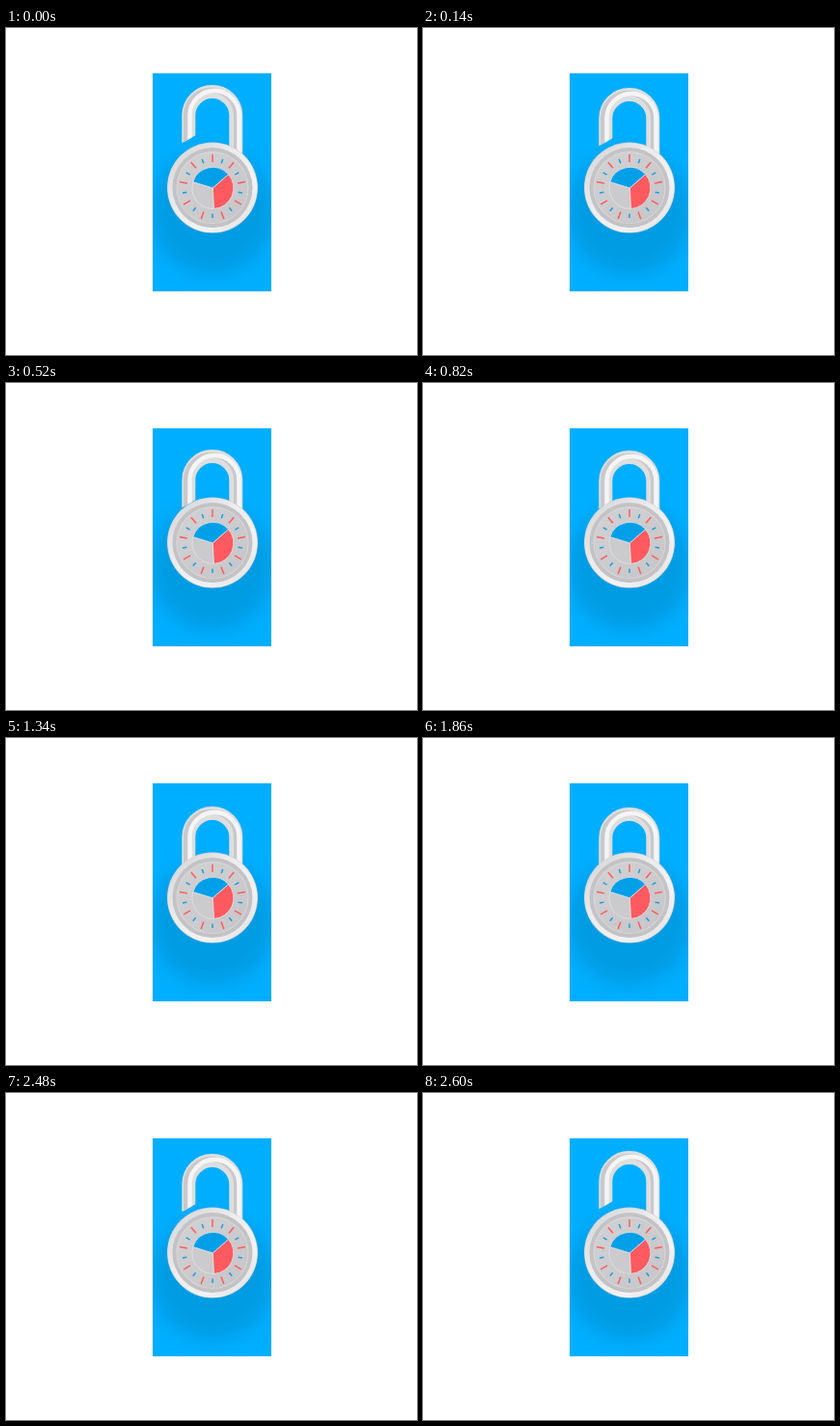
An HTML page that plays this animation: 426 px wide and 339 px high, repeating every 2.64 s.

```html
<!DOCTYPE html>
<html lang="en">
<head>
<meta charset="utf-8">
<title>Padlock</title>
<style>
  html, body { margin: 0; width: 100%; height: 100%; overflow: hidden; background: #fff; }
  svg { display: block; width: 100%; height: 100%; }
</style>
</head>
<body>
<svg viewBox="0 0 426 339">
  <defs>
    <linearGradient id="rim" x1="0" y1="0" x2="1" y2="1">
      <stop offset="0" stop-color="#d2d2d4"/>
      <stop offset=".4" stop-color="#ececee"/>
      <stop offset=".7" stop-color="#f2f2f3"/>
      <stop offset="1" stop-color="#dcdcde"/>
    </linearGradient>
    <linearGradient id="plate" x1="0" y1="0" x2="1" y2="1">
      <stop offset="0" stop-color="#d2d1d4"/>
      <stop offset="1" stop-color="#c6c5c8"/>
    </linearGradient>
    <radialGradient id="shade">
      <stop offset=".55" stop-color="#009ce3"/>
      <stop offset=".7" stop-color="#009fe8" stop-opacity=".85"/>
      <stop offset="1" stop-color="#00aeff" stop-opacity="0"/>
    </radialGradient>
    <clipPath id="panel"><path d="M152 47h123v226h-123z"/></clipPath>
    <clipPath id="cut"><path d="M175 50H252V150H226V111H197L181 120H175Z"/></clipPath>
  </defs>

  <g clip-path="url(#panel)">
    <path d="M152 47h123v226h-123z" fill="#00aeff"/>
    <ellipse cx="214" cy="191" rx="85" ry="85" fill="url(#shade)"/>
  </g>

  <g id="shackle" fill="none">
    <g id="bar" clip-path="url(#cut)"></g>
  </g>

  <g transform="translate(214 165.6)">
    <circle r="47" fill="#d3d3d5"/>
    <circle r="46.3" fill="url(#rim)"/>
    <circle r="41.5" fill="#c3c3c6"/>
    <circle r="37.5" fill="#dad9dc"/>
    <circle r="36.7" fill="url(#plate)"/>
    <g id="ticks"></g>
    <g id="pie" transform="translate(.4 .3)"></g>
  </g>
</svg>
<script>
  const LOOP = 2640, STEP = 40, TRAVEL = 13, RISE_START = 2160;
  const DROP_TIMES = [40, 80, 120, 180, 240, 300, 360, 420, 480, 520, 820, 1340, 1860];
  const byId = id => document.getElementById(id);

  function add(parent, tag, attributes) {
    const node = document.createElementNS("http://www.w3.org/2000/svg", tag);
    for (const name in attributes) node.setAttribute(name, attributes[name]);
    parent.append(node);
  }

  // A round-topped bar, given by the centre and radius of its middle line.
  function arch(centre, radius, width, stroke) {
    add(byId("bar"), "path", {
      d: `M${centre - radius} 150V90.5a${radius} ${radius} 0 0 1 ${2 * radius} 0V150`,
      stroke, "stroke-width": width
    });
  }
  arch(213.8, 24.5, 14, "#dededf");
  arch(212.5, 26, 5, "#c9c9cb");
  arch(216, 25.5, 4.5, "#f5f5f6");

  for (let i = 0; i < 18; i++) {
    const red = i % 2 === 0;
    add(byId("ticks"), "path", {
      d: red ? "M0-34.5V-26.5" : "M0-31.5V-27",
      stroke: red ? "#ff5c62" : "#1a9fe0",
      "stroke-width": 1.5,
      transform: `rotate(${i * 20})`
    });
  }

  function sector(from, to, radius, fill) {
    const point = degrees => {
      const a = degrees * Math.PI / 180;
      return `${radius * Math.cos(a)} ${radius * Math.sin(a)}`;
    };
    add(byId("pie"), "path", {
      d: `M0 0L${point(from)}A${radius} ${radius} 0 0 1 ${point(to)}Z`,
      fill, stroke: "#e4e3e6", "stroke-width": .8
    });
  }
  sector(87, 197, 21.5, "#cbcacd");
  sector(-163, -41, 21.5, "#009fe8");
  sector(-41, 87, 21.5, "#ff5a60");

  function drop(t) {
    if (t < RISE_START) return DROP_TIMES.filter(time => t >= time).length;
    return TRAVEL - 1 - Math.floor((t - RISE_START) / STEP);
  }

  function draw() {
    byId("shackle").setAttribute("transform", `translate(0 ${drop(performance.now() % LOOP)})`);
    requestAnimationFrame(draw);
  }
  draw();
</script>
</body>
</html>
```
